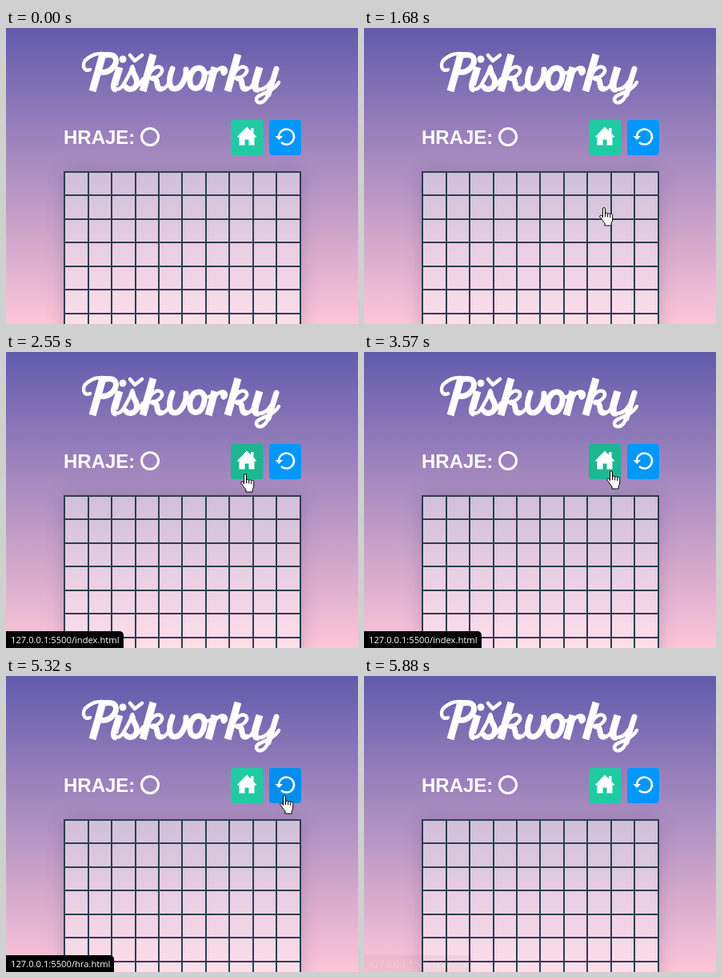
Write an HTML page that moves like this. It is 440x370 px and loops after 6.29 s.

```html
<!DOCTYPE html>
<html lang="cs">
<head>
<meta charset="utf-8">
<title>Piškvorky</title>
<style>
  html, body { margin: 0; width: 100%; height: 100%; overflow: hidden; }
  body { position: relative; background: linear-gradient(#625bac, #fec6d8 370px); }
  #board {
    position: absolute; left: 72px; top: 179px; width: 297px; height: 297px;
    background: rgba(255, 255, 255, .42);
    box-shadow: 0 0 20px rgba(60, 60, 110, .25);
  }
  svg { position: absolute; left: 0; top: 0; }
  .label { font: bold 24px "Liberation Sans", Arial, sans-serif; fill: #fdfcfe; }
  #status {
    position: absolute; left: 0; top: 349px; height: 21px; box-sizing: border-box;
    padding-left: 6px; border-radius: 0 5px 0 0; background: #000; color: #fff;
    font: 11.2px/21px "Open Sans", "Noto Sans", sans-serif; white-space: nowrap;
  }
</style>
</head>
<body>
<div id="board"></div>
<svg width="440" height="370" viewBox="0 0 440 370">
  <path id="grid" fill="none" stroke="#2c3e50" stroke-width="2"/>

  <g role="img" aria-label="Piškvorky" fill="none" stroke="#fefdfe" stroke-linejoin="round">
    <path stroke-width="9" d="M121 33L108 79M142 49L136 69Q134 76 138 76M184 33L171 79M261 49L253 79M290 33L277 79M317 49L312 66Q309 77 316 76"/>
    <path stroke-width="7" stroke-linecap="round" d="M124 34C139 31 140 42 134 49C129 55 123 56 118 55
      M158 51C158 58 166 63 163 71C161 77 153 78 150 74
      M184 63C192 63 186 77 194 76M290 63C298 63 292 77 300 76
      M208 51C203 63 203 76 211 76C219 76 226 62 225 52
      M242 50C233 49 229 59 230 68C231 78 242 78 246 68C250 59 248 51 242 50
      M270 51C275 50 274 55 272 56M338 51L328 83"/>
    <path stroke-width="4.5" stroke-linecap="round" d="M105 52C96 56 94 43 102 38C109 32 119 31 127 33
      M137 76C142 78 146 73 149 67C153 60 156 55 158 48M163 73Q168 70 171 64M155 34L161 41L170 34
      M177 62C181 51 189 46 194 50C198 55 190 62 182 63M194 77Q200 76 204 68
      M283 62C287 51 295 46 300 50C304 55 296 62 288 63M300 77Q306 76 311 67
      M225 51C224 59 229 61 234 56M246 53Q253 60 259 52M258 63C261 54 266 49 271 50
      M316 77Q325 77 331 67M328 82C324 95 313 96 313 89C313 82 333 82 341 68"/>
    <circle cx="146" cy="39" r="4.5" fill="#fefdfe" stroke="none"/>
  </g>

  <text class="label" x="72" y="145">HRAJE:</text>
  <circle cx="180" cy="136" r="10.5" fill="none" stroke="#fdfcfe" stroke-width="3"/>

  <rect x="281" y="115" width="40.5" height="44" rx="4" fill="#20cba3"/>
  <rect id="homeHover" x="281" y="115" width="40.5" height="44" rx="4"/>
  <path fill="#fff" d="M301 123.500L306 128.500V125H309.500V132L313.500 136.500H310.500V146.500H303.500V139.500H298.500V146.500H291.500V136.500H288.500Z"/>

  <rect x="329" y="115" width="40" height="44" rx="4" fill="#0397fc"/>
  <rect id="resetHover" x="329" y="115" width="40" height="44" rx="4"/>
  <path fill="none" stroke="#fff" stroke-width="2.500" d="M341 136A9.500 9.500 0 1 1 344 143"/>
  <path fill="#fff" d="M336.500 135H346L341.200 140Z"/>
</svg>
<div id="status"></div>
<svg width="440" height="370" viewBox="0 0 440 370">
  <g id="cursor" fill="#fff" stroke="#000" stroke-linejoin="round">
    <path id="arrow" d="M.5 .5V16.500L4.200 13L6.800 19L9.200 18L6.600 12H11.500Z"/>
    <path id="hand" d="M-1.500 13V2a1.500 1.500 0 0 1 3 0V8.500a1.600 1.600 0 0 1 3.200 .4a1.500 1.500 0 0 1 3 .7a1.500 1.500 0 0 1 3 .9V15Q10.700 17.500 9.200 19.500V23H1V20Q-1 18-2.500 15.500T-5.300 12a1.600 1.600 0 0 1 2.300-1.800Q-2 11-1.500 13ZM1.500 8V12M4.700 9V12.500M7.700 10V13"/>
  </g>
</svg>
<script>
const LOOP = 6290;
const $ = id => document.getElementById(id);
const ramp = (t, a, b) => Math.min(1, Math.max(0, (t - a) / (b - a)));
const linear = p => p, easeIn = p => p * p, easeOut = p => p * (2 - p);
const smooth = p => p * p * (3 - 2 * p);

const columns = [73, 103, 132, 162, 191, 220, 250, 279, 309, 338, 368];
let lines = columns.map(x => `M${x} 179V370`).join('');
for (let i = 0; i < 7; i++) lines += `M72 ${180 + Math.floor(29.5 * i)}H369`;
$('grid').setAttribute('d', lines);

// time, x, y of the pointer tip, easing towards that point
const path = [
  [1280, 323, 369], [1890, 297, 205, easeOut], [1940, 297, 205, linear],
  [2040, 298, 179, linear], [2180, 299, 152, easeOut], [3420, 299, 152, linear],
  [3570, 309, 148, smooth], [3750, 309, 148, linear], [3950, 348, 149, smooth],
  [5320, 348, 149, linear], [5650, 338, 236, easeIn], [5800, 334, 372, linear]
];

function tipAt(t) {
  const i = path.findIndex(k => k[0] > t);
  if (i < 1) return null;
  const [t0, x0, y0] = path[i - 1], [t1, x1, y1, ease] = path[i];
  const p = ease((t - t0) / (t1 - t0));
  return [x0 + (x1 - x0) * p, y0 + (y1 - y0) * p];
}

function isClickable(x, y) {
  const onButton = y < 159 && (x < 321.5 || x > 329);
  return onButton || y > 181;
}

function show(id, visible) {
  $(id).style.display = visible ? '' : 'none';
}

function draw(now) {
  const t = now % LOOP;
  const tip = tipAt(t);
  show('cursor', tip);
  if (tip) {
    const [x, y] = tip.map(Math.round), hand = isClickable(x, y);
    $('cursor').setAttribute('transform', `translate(${x} ${y})`);
    show('hand', hand);
    show('arrow', !hand);
  }

  $('homeHover').style.opacity = .1 * (ramp(t, 2140, 2440) - ramp(t, 3800, 4000));
  $('resetHover').style.opacity = .06 * (ramp(t, 3860, 4060) - ramp(t, 5360, 5560));

  const onHome = t < 3880, status = $('status');
  status.textContent = '127.0.0.1:5500/' + (onHome ? 'index.html' : 'hra.html');
  status.style.width = onHome ? '147px' : '135px';
  status.style.opacity = ramp(t, 2230, 2400) - .96 * ramp(t, 5690, 5880);

  requestAnimationFrame(draw);
}
requestAnimationFrame(draw);
</script>
</body>
</html>
```
